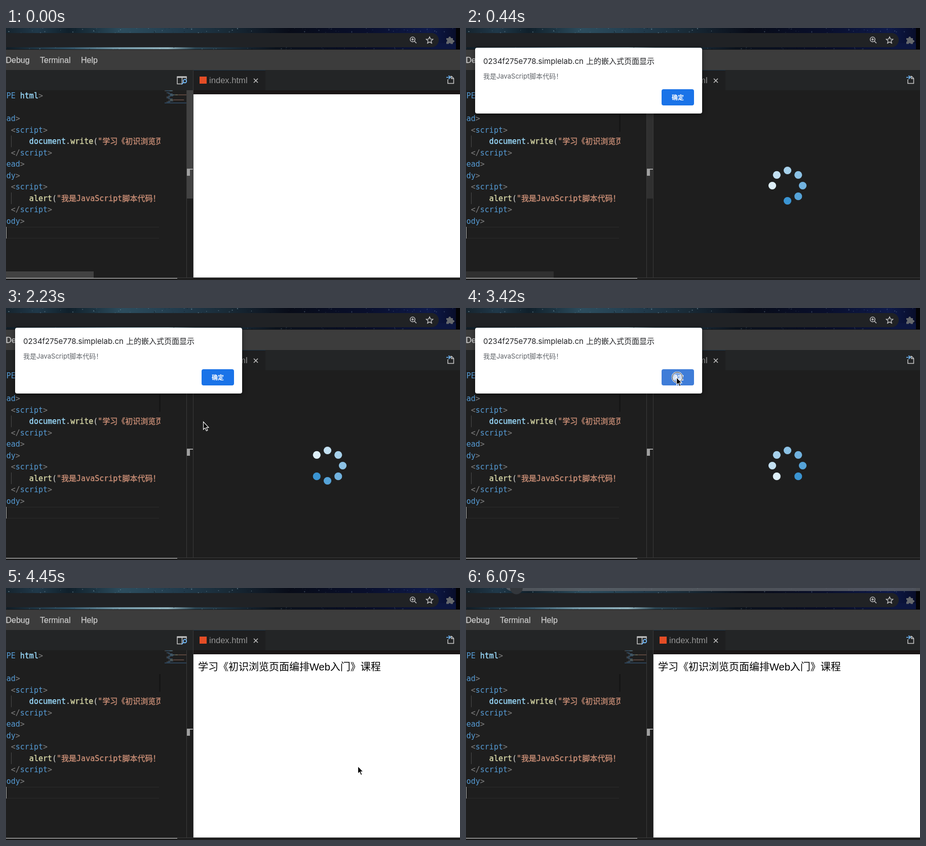
Recreate the animation shown at these times as an HTML page. Size 896 by 498 pixels, loop 6.17 s.

```html
<!DOCTYPE html>
<html lang="zh-CN">
<head>
<meta charset="utf-8">
<title>Script demo</title>
<style>
  html, body { margin: 0; width: 100%; height: 100%; overflow: hidden; background: #1e1e1e; }
  svg { display: block; }
  text { white-space: pre; }
  .ui { font: 16px "Liberation Sans", "Noto Sans CJK SC", sans-serif; fill: #ccc; }
  .menu { stroke: #ccc; stroke-width: .25; }
  .code { font: 15px "DejaVu Sans Mono", "Noto Sans CJK SC", "Noto Sans CJK", monospace; fill: #d4d4d4; stroke-width: .35; }
  .alert { font: 13px Inter, "Noto Sans CJK SC", "Noto Sans CJK", sans-serif; fill: #5f6368; }
  .tag { fill: #569cd6; }
  .punct { fill: #808080; }
  .name { fill: #9cdcfe; stroke: #9cdcfe; }
  .func { fill: #dcdcaa; stroke: #dcdcaa; }
  .str { fill: #ce9178; stroke: #ce9178; }
  .line { fill: none; stroke: #c5c5c5; stroke-width: 1.5; }
  .blue { fill: none; stroke: #75beff; stroke-width: 1.7; }
  #dialog { filter: drop-shadow(0 2px 5px rgba(0, 0, 0, .5)); }
</style>
</head>
<body>
<svg width="896" height="498" viewBox="0 0 896 498">
  <defs>
    <linearGradient id="skyTop">
      <stop offset="0" stop-color="#16242e"/>
      <stop offset=".07" stop-color="#20394a"/>
      <stop offset=".14" stop-color="#10202b"/>
      <stop offset=".26" stop-color="#2c4d5e"/>
      <stop offset=".4" stop-color="#20394a"/>
      <stop offset=".5" stop-color="#182935"/>
      <stop offset=".63" stop-color="#080c18"/>
      <stop offset=".8" stop-color="#090f2c"/>
      <stop offset=".94" stop-color="#0e1a4a"/>
      <stop offset="1" stop-color="#080d2a"/>
    </linearGradient>
    <linearGradient id="skyLow">
      <stop offset="0" stop-color="#101c25"/>
      <stop offset=".14" stop-color="#2f5063"/>
      <stop offset=".25" stop-color="#7397a6"/>
      <stop offset=".36" stop-color="#8fb0bb"/>
      <stop offset=".42" stop-color="#2a4452"/>
      <stop offset=".6" stop-color="#0b121c"/>
      <stop offset=".8" stop-color="#080d26"/>
      <stop offset=".95" stop-color="#0d1740"/>
    </linearGradient>
    <clipPath id="codeClip"><rect y="120" width="305" height="374"/></clipPath>
  </defs>

  <!-- browser bar -->
  <rect width="888" height="30" fill="url(#skyTop)"/>
  <rect y="30" width="888" height="12" fill="url(#skyLow)"/>
  <g id="stars"></g>
  <rect x="888" width="8" height="43" fill="#030305"/>
  <rect x="-20" y="10" width="874" height="28" rx="14" fill="#202225"/>
  <g class="line">
    <circle cx="802.5" cy="22.5" r="4.7"/>
    <path d="M806 26l4 4M800 22.5h5M802.5 20v5"/>
    <path d="M836 17.5l1.9 4.400 4.700.4-3.600 3.100 1.100 4.600-4.100-2.400-4.100 2.400 1.100-4.600-3.600-3.100 4.700-.4z" stroke-width="1.4"/>
  </g>
  <path d="M869 20h4.500a2.300 2.300 0 1 1 4.400 0h4.100v4a2.300 2.300 0 1 1 0 4.400v3.100h-4.200a2.200 2.200 0 0 0-4.300 0h-4.500v-4.200a2.200 2.200 0 0 0 0-4.300z" fill="#66696d"/>
  <path id="tabHint" d="M79 0H896V6H92Q83 6 79 0z" fill="#5b5f64" fill-opacity=".85"/>
  <path id="tabDot" d="M87 0a12 12 0 0 0 25 0z" fill="#33373c"/>

  <!-- editor chrome -->
  <rect y="42" width="896" height="1" fill="#17181a"/>
  <rect y="43" width="896" height="40" fill="#3c3c3c"/>
  <rect y="83" width="896" height="40" fill="#232526"/>
  <rect x="370" y="84" width="142" height="39" fill="#1e1f20"/>
  <path d="M370 83.5h142" stroke="#1b3040"/>
  <g class="ui">
    <g class="menu">
      <text x="-.5" y="69">Debug</text>
      <text x="67" y="69">Terminal</text>
      <text x="148" y="69">Help</text>
    </g>
    <text x="401" y="109" style="font-size:16.6px;fill:#969696">index.html</text>
  </g>
  <rect x="382" y="96" width="14" height="14" fill="#e44d26"/>
  <path class="line" d="M489 100l8 8M497 100l-8 8"/>
  <path class="line" d="M348 110.5h-10v-14h18v5M347.5 97v13"/>
  <path d="M337.5 95.5h19v3h-19z" fill="#c5c5c5"/>
  <g class="blue"><circle cx="353" cy="105" r="3.3"/><path d="M350.5 107.5l-4 4"/></g>
  <path class="line" d="M872 101.5v8h11.500v-10l-4-4h-2.500M879 95.5v4.500h4.500"/>
  <path class="blue" d="M869 97.5h7.500M873.5 94l3.500 3.500-3.500 3.500"/>

  <!-- editor body -->
  <rect y="123" width="896" height="375" fill="#1e1e1e"/>
  <path d="M0 393.5H302M0 415.5H302" stroke="#2a2a2a"/>
  <path d="M10.5 212.5v23M10.5 325v23" stroke="#4a4a4a"/>
  <g class="code" id="code" clip-path="url(#codeClip)"></g>
  <rect y="393" width="1" height="23" fill="#aeafad"/>
  <g id="minimap" stroke="none"></g>
  <rect id="edge" x="302" y="170" width="3" height="35" fill="#161616"/>
  <path d="M356.5 123V493M369.5 84V493" stroke="#3a3a3a"/>
  <g id="bars" fill="#424242">
    <rect x="357" y="123" width="12" height="214"/>
    <rect y="481" width="173" height="13"/>
  </g>
  <path d="M357 278h12v2h-6v12h-6z" fill="#a0a0a0"/>
  <path d="M338 493.5H896" stroke="#3a3a3a"/>
  <path d="M0 494.5H338" stroke="#e2e2e2"/>

  <!-- preview -->
  <g id="page">
    <rect x="370" y="123" width="526" height="8" fill="#1a1616"/>
    <rect x="370" y="131" width="526" height="362" fill="#fff"/>
    <text id="result" class="ui" x="379" y="162.5" style="font-size:20px;fill:#000">学习《初识浏览页面编排Web入门》课程</text>
  </g>
  <g id="spinner"></g>

  <g id="dialog">
    <rect x="18" y="39" width="448" height="130" rx="4" fill="#fff"/>
    <g class="alert">
      <text x="34" y="71" style="font-size:15px;fill:#202124">0234f275e778.simplelab.cn</text>
      <text x="237" y="71" style="font-size:15px;fill:#202124">上的嵌入式页面显示</text>
      <text x="34" y="100">我是JavaScript脚本代码！</text>
      <rect id="button" x="386" y="121" width="64" height="32" rx="4"/>
      <text x="418" y="141.5" text-anchor="middle" style="font-size:12px;font-weight:700;fill:#fff">确定</text>
    </g>
  </g>

  <g id="ring">
    <circle cx="417" cy="137" r="10" fill="#fff" fill-opacity=".3" stroke="#fff" stroke-width="2.5"/>
    <circle cx="417" cy="137" r="10" fill="none" stroke="#222" stroke-width="1"/>
  </g>
  <path id="pointer" d="M.5 0V15l3.400-3 2.500 5.800 2.500-1.100-2.500-5.600h4.600z" fill="#000" stroke="#fff" stroke-width="1.1"/>
</svg>

<script>
const LOOP = 6170;
const $ = id => document.getElementById(id);

function add(parent, tag, attrs, text) {
  const el = document.createElementNS("http://www.w3.org/2000/svg", tag);
  for (const key in attrs) el.setAttribute(key, attrs[key]);
  if (text) el.textContent = text;
  parent.append(el);
  return el;
}

const show = (id, on) => { $(id).style.display = on ? "" : "none"; };

// Background sky: small stars and dark specks
let seed = 7;
const rand = () => (seed = seed * 16807 % 2147483647) / 2147483647;
for (let i = 0; i < 160; i++) {
  const x = rand() * 886;
  add($("stars"), "circle", {
    cx: x, cy: rand() < .7 ? rand() * 10 : 38 + rand() * 4, r: .4 + rand() * .8,
    fill: rand() < .4 ? "#05090f" : "#a9cbdc", opacity: (.15 + rand() * .4) * (x < 500 ? 1 : .6)
  });
}

// Code rows: [row, column, [class, text]...]
const element = (row, name, col = 4) => {
  const slash = name[0] === "/";
  return [row, col, ["punct", slash ? "</" : "<"], ["tag", slash ? name.slice(1) : name], ["punct", ">"]];
};
const rows = [
  [0, 0, ["punct", "<!"], ["tag", "DOCTYPE"], ["name", " html"], ["punct", ">"]],
  element(2, "head"),
  element(3, "script", 8),
  [4, 12, ["name", "document"], ["", "."], ["func", "write"], ["", "("], ["str", '"学习《初识浏览页面编排Web入门》课程"']],
  element(5, "/script", 8),
  element(6, "/head"),
  element(7, "body"),
  element(8, "script", 8),
  [9, 12, ["func", "alert"], ["", "("], ["str", '"我是JavaScript脚本代码！"']],
  element(10, "/script", 8),
  element(11, "/body")
];
for (const [row, col, ...parts] of rows) {
  const line = add($("code"), "text", { x: -62.5 + col * 9.03, y: 139 + row * 22.5 });
  let x = 313 + col * .9;
  for (const [cls, text] of parts) {
    add(line, "tspan", { class: cls }, text);
    const width = Math.min(text.length * 1.1, 356 - x);
    add($("minimap"), "rect", { x, y: 123.5 + row * 2, width, height: 1.2, class: cls || "punct", opacity: .55, style: "stroke:none" });
    x += width;
  }
}
add($("minimap"), "rect", { x: 313, y: 147.5, width: 43, height: 1.2, fill: "#35597a" });

// Loading dots, clockwise from the top
const dots = Array.from({ length: 8 }, (_, i) => {
  const a = i * Math.PI / 4;
  return add($("spinner"), "circle", { cx: 634.5 + 30 * Math.sin(a), cy: 311.5 - 30 * Math.cos(a), r: 7.6 });
});
const shade = n => {
  const mix = (a, b) => Math.round(a + (b - a) * n / 6);
  return `rgb(${mix(58, 222)},${mix(148, 239)},${mix(210, 248)})`;
};

// Screen refresh times: 150 ms apart, a few of them 10 ms shorter
const shortTicks = [1, 3, 20, 23, 27];
const starts = [0];
for (let k = 0; k < 40; k++) starts.push(starts[k] + (shortTicks.includes(k) ? 140 : 150));

// Pointer path: [tick, x, y]
const path = [
  [12, 520, 484], [13, 480, 430], [14, 428, 325], [15, 389, 225], [16, 398, 151],
  [17, 408, 141], [20, 414, 139], [21, 415, 137], [24, 415, 137], [25, 420, 141],
  [26, 438, 154], [27, 480, 188], [28, 550, 243], [29, 630, 304], [30, 694, 352],
  [31, 762, 405], [32, 817, 451], [33, 853, 476], [34, 882, 494]
];
function pointerAt(k) {
  const i = path.findIndex(p => p[0] >= k);
  if (i < 0 || k < path[0][0]) return null;
  const [k1, x1, y1] = path[i];
  if (k1 === k) return [x1, y1];
  const [k0, x0, y0] = path[i - 1];
  const f = (k - k0) / (k1 - k0);
  return [x0 + (x1 - x0) * f, y0 + (y1 - y0) * f];
}

function draw(now) {
  const t = now % LOOP;
  let k = 0;
  while (k + 1 < starts.length && starts[k + 1] <= t) k++;

  const loading = k >= 1 && k < 24;
  show("page", !loading);
  show("result", k >= 24);
  show("spinner", loading);
  const head = 2 + (k - 1) - Math.floor((k - 1) / 4);
  dots.forEach((dot, i) => {
    const age = ((head - i) % 8 + 8) % 8;
    dot.setAttribute("fill", age < 7 ? shade(age) : "none");
  });

  const closing = k === 24;
  show("dialog", k >= 3 && k <= 24);
  $("dialog").setAttribute("opacity", closing ? .4 : 1);
  $("dialog").setAttribute("transform", closing ? "translate(0 -6)" : "");
  $("button").setAttribute("fill", k >= 18 ? "#3f7dd8" : "#1a73e8");
  show("ring", k === 22 || k === 23);

  show("bars", k < 4);
  $("bars").setAttribute("opacity", k === 3 ? .5 : 1);
  show("edge", k >= 3);

  const at = pointerAt(k);
  show("pointer", at);
  if (at) $("pointer").setAttribute("transform", `translate(${at})`);

  show("tabHint", t >= 6070);
  show("tabDot", t >= 6070);
}

function loop() {
  draw(performance.now());
  requestAnimationFrame(loop);
}
loop();
</script>
</body>
</html>
```
